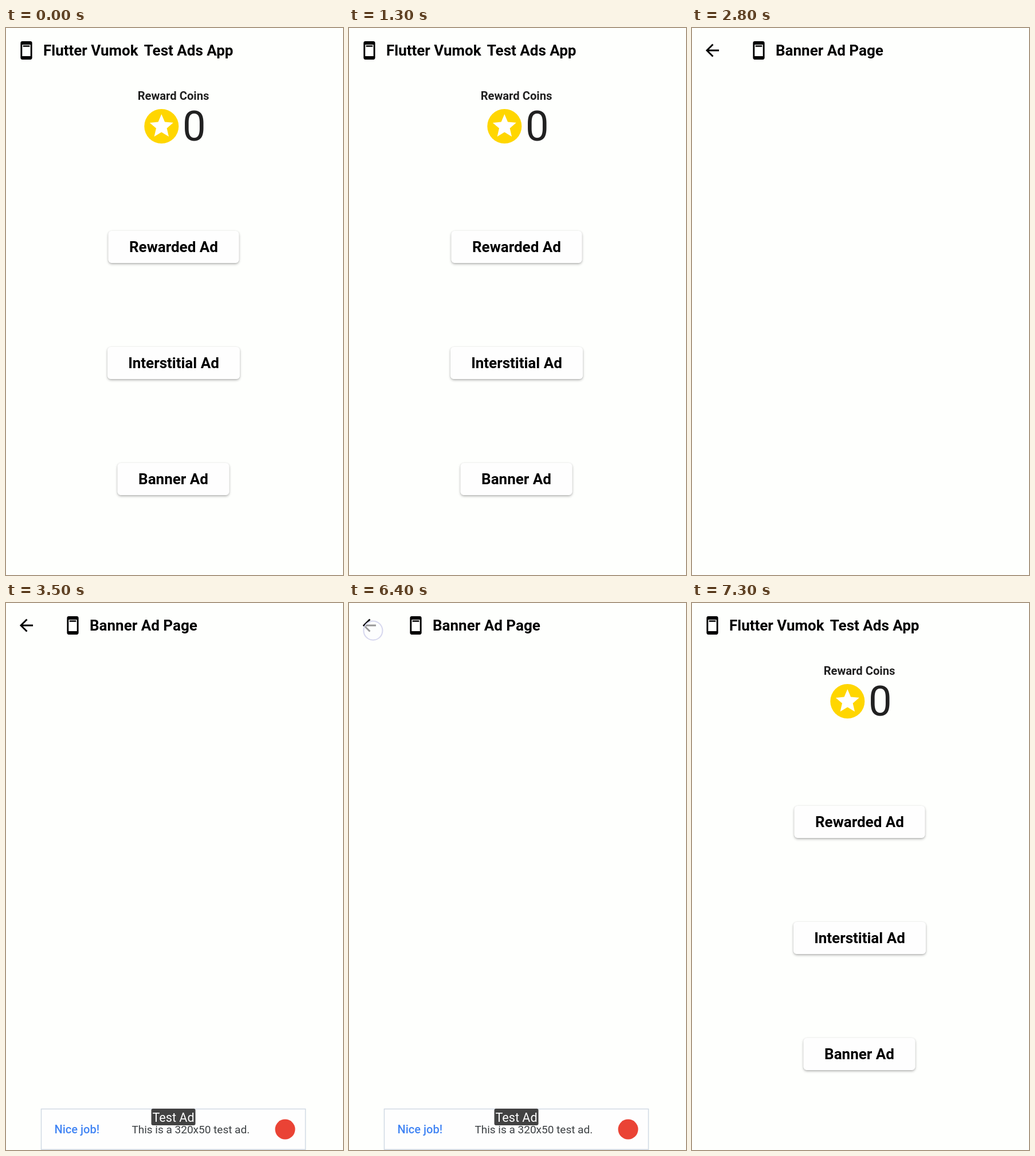
Recreate the animation shown at these times as an HTML page with a canvas. Size 588 by 952 pixels, loop 7.7 s.

```html
<!DOCTYPE html>
<html lang="en">
<head>
<meta charset="utf-8">
<title>Test ads app</title>
<style>
  html, body { margin: 0; width: 100%; height: 100%; overflow: hidden; background: #fefffd; }
  canvas { display: block; width: 588px; height: 952px; }
</style>
</head>
<body>
<canvas id="stage" width="588" height="952"></canvas>
<script>
const ctx = document.getElementById('stage').getContext('2d');
const LOOP = 7700, STEP = 100;
const BG = '#fefffd', INK = '#000', SOFT = '#212121';

const PHONE = new Path2D('M17 1H7C5.9 1 5 1.9 5 3v18c0 1.1.9 2 2 2h10c1.1 0 2-.9 2-2V3c0-1.1-.9-2-2-2z' +
  'M17 19H7V5h10zM16 6H8v1.6h8z');
const ARROW = new Path2D('M20 11H7.83l5.59-5.59L12 4l-8 8 8 8 1.41-1.41L7.83 13H20z');
const STAR = new Path2D('M16.23 18L12 15.45 7.77 18l1.12-4.81-3.73-3.23 4.92-.42L12 5l1.92 4.53 4.92.42-3.73 3.23z');

const BUTTONS = [
  { label: 'Rewarded Ad', x: 178.5, y: 353, w: 228 },
  { label: 'Interstitial Ad', x: 177, y: 555, w: 231 },
  { label: 'Banner Ad', x: 194.5, y: 757, w: 195 }
];

const clamp = v => Math.max(0, Math.min(1, v));
const ramp = (t, from, to) => clamp((t - from) / (to - from));
const mix = (a, b, k) => a + (b - a) * k;

function text(str, x, y, size, weight, color, align = 'left') {
  ctx.font = `${weight} ${size}px Roboto, sans-serif`;
  ctx.textAlign = align;
  ctx.fillStyle = color;
  ctx.fillText(str, x, y);
}

function icon(path, x, y, scale, color) {
  ctx.save();
  ctx.translate(x - 12 * scale, y - 12 * scale);
  ctx.scale(scale, scale);
  ctx.fillStyle = color;
  ctx.fill(path, 'evenodd');
  ctx.restore();
}

function disc(x, y, r, color) {
  ctx.fillStyle = color;
  ctx.beginPath();
  ctx.arc(x, y, r, 0, 2 * Math.PI);
  ctx.fill();
}

function box(x, y, w, h, r, color) {
  ctx.fillStyle = color;
  ctx.beginPath();
  ctx.roundRect(x, y, w, h, r);
  ctx.fill();
}

function shadow(alpha, blur, dy) {
  ctx.shadowColor = `rgba(0,0,0,${alpha})`;
  ctx.shadowBlur = blur;
  ctx.shadowOffsetY = dy;
}

function button({ label, x, y, w }, lift) {
  ctx.save();
  shadow(mix(0.27, 0.32, lift), mix(4, 18, lift), mix(2, 8, lift));
  box(x, y, w, 56, 6, '#fefefe');
  shadow(0.13, 2, 0.5);
  box(x, y, w, 56, 6, '#fefefe');
  ctx.restore();
  text(label, x + w / 2, y + 37.3, 26, 700, INK, 'center');
}

function homePage(lift) {
  icon(PHONE, 35.5, 39, 1.444, INK);
  text('Flutter Vumok', 65, 48.3, 26, 700, INK);
  text('Test Ads App', 396.5, 48.3, 26, 700, INK, 'right');
  text('Reward Coins', 292, 124.5, 20.2, 700, SOFT, 'center');
  disc(271.3, 171, 30, '#ffd600');
  icon(STAR, 271.3, 171, 3, '#fff');
  text('0', 328.2, 195.5, 72.2, 400, SOFT, 'center');
  BUTTONS.forEach((b, i) => button(b, i === 2 ? lift : 0));
}

function banner() {
  ctx.fillStyle = '#fefefe';
  ctx.fillRect(61, 880, 462, 72);
  ctx.strokeStyle = '#d0d9e4';
  ctx.lineWidth = 1.5;
  ctx.strokeRect(61.5, 880.6, 461, 70.6);
  text('Nice job!', 84.5, 923.3, 20, 500, '#4285f4');
  text('This is a 320x50 test ad.', 322.3, 923.3, 19, 400, '#3c4043', 'center');
  box(253.5, 880, 77, 29, 3, '#424242');
  text('Test Ad', 292, 903, 21.6, 400, '#fff', 'center');
  disc(487, 916, 17.5, '#ea4335');
}

function touchRing(x, y) {
  disc(x, y, 16.5, 'rgba(254,254,255,0.6)');
  ctx.strokeStyle = '#d6d7ee';
  ctx.lineWidth = 2;
  ctx.stroke();
}

function bannerPage(t) {
  ctx.fillStyle = BG;
  ctx.fillRect(0, 0, 588, 952);
  icon(ARROW, 35.5, 39, 1.444, INK);
  icon(PHONE, 116.5, 39, 1.444, INK);
  text('Banner Ad Page', 146, 48.3, 26, 700, INK);
  if (t >= 3500) banner();
  if (t >= 6400 && t < 6600) touchRing(42, 48);
}

// The page is composed apart so that its layers fade as one.
function draw(t) {
  const page = ramp(t, 2600, 2800) * (1 - ramp(t, 6500, 6700));
  const lift = t < 5000 ? ramp(t, 2200, 2500) : 0;
  ctx.globalAlpha = 1;
  ctx.fillStyle = BG;
  ctx.fillRect(0, 0, 588, 952);
  if (page < 1) homePage(lift);
  ctx.globalAlpha = page;
  if (page > 0) bannerPage(t);
}

const start = performance.now();
function frame() {
  const t = (performance.now() - start) % LOOP;
  draw(Math.floor(t / STEP) * STEP);
  requestAnimationFrame(frame);
}
frame();
</script>
</body>
</html>
```
